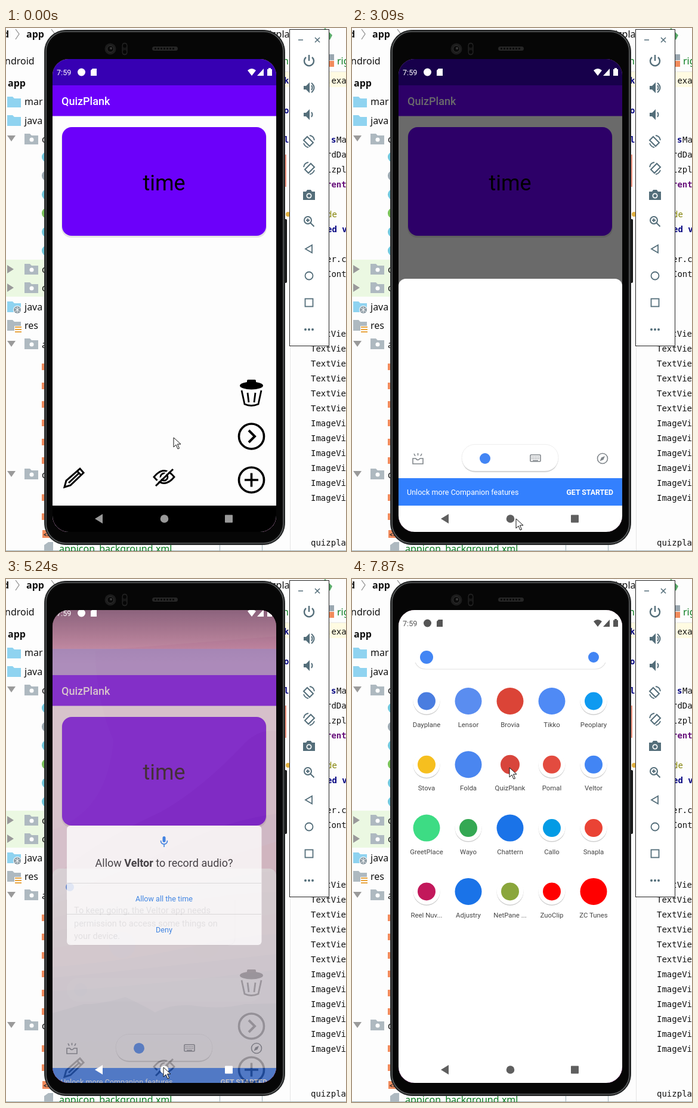
An HTML page for the animation above (8000 ms loop, 570 by 876 pixels).

```html
<!DOCTYPE html>
<html lang="en">
<head>
<meta charset="utf-8">
<title>Card app in an emulator</title>
<style>
html, body { margin: 0; width: 100%; height: 100%; overflow: hidden; background: #fff; }
svg { display: block; width: 570px; height: 876px; }
text { font-family: Roboto, sans-serif; white-space: pre; }
.ide { font: 16px "Noto Sans", "Open Sans", sans-serif; fill: #111; }
.code { font: 14px "DejaVu Sans Mono", monospace; fill: #111; }
.b { font-weight: 700; }
.m { font-weight: 500; }
.mid { text-anchor: middle; }
</style>
</head>
<body>
<svg id="stage" viewBox="0 0 570 876"></svg>
<script>
const LOOP = 8000;
const stage = document.getElementById('stage');

// ---- drawing helpers ----
const rect = (x, y, w, h, fill, r = 0, more = '') =>
  `<rect x="${x}" y="${y}" width="${w}" height="${h}" rx="${r}" fill="${fill}" ${more}/>`;
const disc = (x, y, r, fill, more = '') => `<circle cx="${x}" cy="${y}" r="${r}" fill="${fill}" ${more}/>`;
const path = (d, fill, more = '') => `<path d="${d}" fill="${fill}" ${more}/>`;
const stroke = (d, color, w = 2, more = '') =>
  `<path d="${d}" fill="none" stroke="${color}" stroke-width="${w}" ${more}/>`;
const text = (x, y, s, size, fill, cls = '', more = '') =>
  `<text x="${x}" y="${y}" font-size="${size}" fill="${fill}" class="${cls}" ${more}>${s}</text>`;
const group = (id, body, more = '') => `<g id="${id}" ${more}>${body}</g>`;

// ---- code editor behind the device ----
const ide = (x, y, s, cls = '', style = '') => `<text x="${x}" y="${y}" class="ide ${cls}" style="${style}">${s}</text>`;
const code = (x, y, s, cls = '', fill = '#111') => `<text x="${x}" y="${y}" class="code ${cls}" style="fill:${fill}">${s}</text>`;
const folder = (x, y, c, dot) =>
  path(`M${x} ${y - 9}h9l3 3h11v15h-23z`, c) + (dot ? disc(x + 12, y + 1, 3.5, '#fff') : '');
const open = y => path(`M2 ${y - 5}h14l-7 10z`, '#9a9a9a');
const shut = y => path(`M2 ${y - 7}l11 7l-11 7z`, '#9a9a9a');

function editor() {
  const blue = '#8fd3f0', gray = '#aeb9c0', navy = '#000080', orange = '#f28b5c';
  let s = rect(0, 0, 570, 876, '#fdfdfd') + rect(0, 388, 70, 62, '#ebf8e2') +
    rect(460, 73, 110, 26, '#fffbe2') + stroke('M460 73H570M476.5 530V876', '#e4e4e4', 1) +
    stroke('M429.5 860V876M358.5 860V876M0 875.5H570', '#9fb2b8', 1);
  s += ide(-5, 16, 'd', 'b') + ide(34, 16, 'app', 'b') + ide(-2, 61, 'ndroid') + ide(3, 98, 'app', 'b') +
    stroke('M16 2l6 8l-6 9M76 2l6 8l-6 9', '#888', 1.2);
  s += folder(2, 124, blue) + ide(31, 129, 'mar') + folder(2, 155, blue) + ide(31, 161, 'java') +
    open(185) + folder(31, 186, gray, 1) + ide(60, 192, 'c');
  ['#6fc7dd', '#9aa7b0', '#6fc7dd', '#78c257', '#6fc7dd', '#6fc7dd']
    .forEach((c, i) => s += disc(69, 216 + i * 31.4, 9, c));
  for (const y of [404, 435]) s += shut(y) + folder(31, y, gray, 1) + ide(60, y + 6, 'c');
  s += folder(2, 467, blue) + disc(19, 472, 7, '#fff') + disc(19, 472, 6, '#8c9aa3') +
    stroke('M15 469l8 6M15 475l8-6M19 467v10', '#fff', 1) + ide(31, 473, 'java');
  s += folder(2, 498, gray) + rect(14, 499, 12, 12, '#fff') +
    stroke('M15 501h11M15 505h11M15 509h11', '#e8a33d', 2) + ide(31, 504, 'res');
  s += open(529) + folder(31, 529, gray, 1) + ide(60, 536, 'a') + open(747) + folder(31, 747, gray, 1) + ide(60, 754, 'd');
  for (const y of [567, 599, 630, 661, 693, 724, 786, 818]) s += rect(60, y - 5, 10, 11, orange);
  s += rect(61, 841, 18, 13, orange) + text(63, 852, '&lt;&gt;', 11, '#333', 'b') +
    path('M64 866l7-5h8v14H64z', '#aeb9c0') + ide(89, 878, 'appicon_background.xml', '', 'fill:#0a7d20;text-decoration:underline');

  s += ide(431, 16, 'uizplan') + path('M527 8l8-8l12 12l-4 8l-6-9l-3 3z', '#59a869') +
    rect(540, 44, 10, 10, '#9aa7b0') + rect(540, 55, 10, 10, orange) +
    ide(555, 61, 'righ', '', 'fill:#0a7d20') + ide(464, 61, 'n', '', 'fill:#0a7d20');
  s += rect(465, 212, 5, 54, '#f0907a') + disc(473, 312, 4, '#e0b040');
  [[88, 'k'], [138, 'o'], [187, 'l']].forEach(([y, c]) => s += code(466, y + 5, c, 'b', navy));
  s += code(537, 93, '.exa') + code(545, 192, 's', 'b', navy) + code(554, 192, 'Ma') + code(537, 217, 'rdDa') +
    code(537, 242, 'izpl') + code(537, 267, 'rent', 'b', '#660e7a') + code(538, 317, 'de', '', '#808000') +
    code(538, 342, 'ed v', 'b', navy) + code(537, 392, 'er.c') + code(537, 417, 'Cont');
  for (let i = 0; i < 12; i++) s += code(511, 517 + i * 25, i < 6 ? 'TextVie' : 'ImageVi');
  return s + code(511, 867, 'quizpla');
}

// ---- emulator side bar ----
function sideBar() {
  const c = '#546e7a', at = (y, body) => `<g transform="translate(508 ${y})">${body}</g>`;
  const speaker = path('M-9 -3h4l6-6v18l-6-6h-4z', c);
  const rotate = stroke('M-3 -8l10 10l-6 6l-10-10z', c, 2) + stroke('M-9 3q2 6 8 7M9 -2q-1-7-8-8', c, 1.8);
  return rect(475.5, 2.5, 66, 530, '#fff', 0, 'stroke="#222"') +
    stroke('M490 20h8M518 16l8 8M526 16l-8 8', c, 1.6) +
    at(55, stroke('M-5 -6a8 8 0 1 0 10 0M0 -10v10', c, 2.4)) +
    at(100, speaker + stroke('M4 -4q3 4 0 8M4 -8q9 8 0 16', c, 2)) +
    at(145, speaker + stroke('M4 -4q3 4 0 8', c, 2)) +
    at(190, rotate) + at(235, `<g transform="scale(-1 1)">${rotate}</g>`) +
    at(280, path('M-10 -6h5l2-3h6l2 3h5v14h-20z', c) + disc(0, 1, 4.5, '#fff') + disc(0, 1, 2.8, c)) +
    at(324, disc(-2, -2, 6, 'none', `stroke="${c}" stroke-width="2"`) + stroke('M2.5 2.5l6 6M-5 -2h6M-2 -5v6', c, 2)) +
    at(370, stroke('M5 -6.5v13l-11-6.5z', c, 1.8)) +
    at(415, disc(0, 0, 6.5, 'none', `stroke="${c}" stroke-width="1.8"`)) +
    at(460, rect(-6.5, -6.5, 13, 13, 'none', 0, `stroke="${c}" stroke-width="1.8"`)) +
    at(505, disc(-6, 0, 2, c) + disc(0, 0, 2, c) + disc(6, 0, 2, c));
}

function deviceBody() {
  return rect(465, 320, 6, 107, '#111', 2) +
    rect(64.5, 3.5, 403, 862, '#0a0a0a', 36, 'stroke="#3c3f40"') +
    rect(67, 6, 398, 857, 'none', 33, 'stroke="#606364" stroke-width="1.6"') +
    rect(70, 9, 392, 851, '#060606', 31) +
    disc(175, 35, 9.5, '#1c1c1c') + disc(175, 35, 5.5, '#0a0a0a', 'stroke="#333"') + disc(176, 34, 2, '#3a3a3a') +
    rect(195, 25, 8, 20, '#161616', 4, 'stroke="#262626"') + disc(199, 30, 3, '#050505') + disc(199, 40, 3, '#050505') +
    rect(245, 31, 43, 7, '#262626', 3.5) + stroke('M249 34.5h35', '#0c0c0c', 3, 'stroke-dasharray="3 2"');
}

// ---- app ----
function app() {
  const ring = y => disc(411.5, y, 21, 'none', 'stroke="#000" stroke-width="3.6"');
  return rect(78, 147, 375, 740, '#fdfdfd') + rect(78, 52, 375, 44, '#3700b3', 0, 'id="strip"') +
    rect(78, 96, 375, 51.5, '#6c00fa') + text(93, 129, 'QuizPlank', 18, '#fff', 'm') +
    rect(93, 168, 344, 183, '#000', 16, 'opacity=".1"') + rect(94, 166, 342, 182, '#6c00fa', 16) +
    text(265, 271.5, 'time', 36, '#000', 'mid') +
    rect(404, 589, 15, 6, '#000', 2) + '<ellipse cx="411.5" cy="599" rx="19.5" ry="6.5"/>' +
    stroke('M395 607l5 23q11 5 23 0l5-23M405 611l2 16M418 611l-2 16', '#000', 2.8) +
    ring(684) + stroke('M407 674l10 10l-10 10', '#000', 4) +
    ring(757) + stroke('M400 757h23M411.5 745.5v23', '#000', 3.6) +
    stroke('M248 752q17-21 34 0q-17 21-34 0z', '#000', 2.8) + disc(265, 752, 6, 'none', 'stroke="#000" stroke-width="2.8"') +
    stroke('M249 764l30-28', '#fdfdfd', 3) + stroke('M251 767l29-28', '#000', 3) +
    stroke('M98 769l3-11l23-20l6 7l-22 21zM119 742l7 7M105 762l18-17', '#000', 3);
}

// ---- voice sheet ----
function sheet() {
  const g = '#80868b';
  return rect(78, 420, 375, 470, '#fff', 12) +
    text(265, 460, 'Try saving', 27, '#111', 'b mid', 'id="heading"') +
    group('bubble', disc(107, 451, 7, '#4285f4') +
      stroke('M102 472v64q0 12 12 12h258q12 0 12-12v-64', '#e0e0e0', 1) +
      text(114, 495, 'To keep going, the Veltor app needs', 14.5, '#5f6368') +
      text(114, 517, 'permission to access some things on', 14.5, '#5f6368') +
      text(114, 538, 'your device.', 14.5, '#5f6368')) +
    stroke('M102 721v9h17v-9h-5q-4 5-7 0zM110.5 712v4M104 713l2 4M117 713l-2 4', g, 1.6) +
    rect(184, 699, 162, 45, '#ccc', 22.5) + rect(184, 697.5, 162, 44.5, '#fff', 22, 'stroke="#eee"') +
    disc(223, 721, 9, '#4285f4') +
    rect(299, 715, 17, 11, 'none', 1, `stroke="${g}" stroke-width="1.6"`) +
    stroke('M301 718.5h13M301 721.5h13', g, 1.6, 'stroke-dasharray="1.6 1.2"') + stroke('M303 724.5h9', g, 1.4) +
    disc(420, 721, 8.5, 'none', `stroke="${g}" stroke-width="1.6"`) + path('M424 717l-2.5 6l-6 2.5l2.5-6z', g) +
    rect(78, 754, 375, 46, '#3380fe') + text(92, 782, 'Unlock more Companion features', 12.6, '#fff') +
    text(438, 782, 'GET STARTED', 12.3, '#fff', 'b', 'text-anchor="end"');
}

function dialog() {
  const b = '#1a73e8';
  return rect(102, 348, 326.5, 200, '#fff', 6) + stroke('M102 444.5H428M102 496.5H428', '#dcdcdc', 1) +
    rect(262.5, 366, 5, 10, b, 2.5) + stroke('M259.5 373q0 6 5.5 6t5.5-6M265 379v5', b, 1.6) +
    text(265, 417, 'Allow <tspan class="b">Veltor</tspan> to record audio?', 18, '#202124', 'mid') +
    text(265, 475, 'Allow all the time', 12.6, b, 'mid') + text(265, 527, 'Deny', 12.6, b, 'mid');
}

// ---- home screen ----
function wallpaper() {
  const hills = [
    ['420Q170 390 180 270Q150 200 150 120L453 96', '#f4a8c8'],
    ['500Q150 440 260 390Q330 350 400 275Q425 250 453 255', '#ea98bc'],
    ['535Q220 480 300 440Q370 405 453 393', '#dc8ab4'],
    ['545Q160 515 250 492Q360 470 453 440', '#de80a4'],
    ['568Q200 535 300 515T453 488', '#d07098'],
    ['590Q180 575 270 550T453 525', '#c46490'],
    ['618Q200 600 300 585T453 560', '#c05288'],
    ['650Q200 640 300 618T453 595', '#a04880'],
    ['668Q220 655 453 628', '#823a78'],
    ['690Q200 685 453 655', '#642a70']
  ];
  return rect(78, 52, 375, 792, '#f8b0cc') +
    hills.map(([d, c]) => path(`M78 ${d}V844H78z`, c)).join('') +
    path('M78 727Q105 720 130 712Q160 713 200 700Q230 714 250 726Q275 712 310 714Q360 722 400 712L453 711V844H78z', '#300049') +
    rect(78, 760, 375, 84, 'url(#low)') + rect(78, 52, 375, 90, 'url(#top)');
}
const searchMarks = y => disc(125, y, 11, '#4285f4') + disc(405, y, 9, '#4285f4');
const dock = () => disc(195, 682, 22, '#1a73e8') + disc(335, 682, 22, '#db4437') +
  rect(102, 737, 326, 40, '#ded6e2', 20, 'opacity=".94"') + searchMarks(757);

// name, colour, white plate
const APPS = [
  ['Dayplane', '#4a7de0', 1], ['Lensor', '#5a8df0'], ['Brovia', '#db4437'], ['Tikko', '#4f8af5'], ['Peoplary', '#0f9af0', 1],
  ['Stova', '#f6bf1f', 1], ['Folda', '#4a86f0'], ['QuizPlank', '#d8453c', 2], ['Pomal', '#e34b3f', 1], ['Veltor', '#4285f4', 1],
  ['GreetPlace', '#3ddc84'], ['Wayo', '#34a853', 1], ['Chattern', '#1a73e8'], ['Callo', '#039be5', 1], ['Snapla', '#ea4335', 1],
  ['Reel Nuv...', '#c2185b', 1], ['Adjustry', '#1a73e8'], ['NetPane ...', '#8aa63c', 1], ['ZuoClip', '#f00', 1], ['ZC Tunes', '#f00']
];
function drawer() {
  let s = rect(78, 52, 375, 900, '#fff') + stroke('M106 140q5 11 18 11h283q13 0 18-11', '#e2e2e2', 1.2) + searchMarks(131);
  APPS.forEach(([name, color, plate], i) => {
    const x = 125 + i % 5 * 70, y = 204.5 + Math.floor(i / 5) * 106.3;
    if (plate === 1) s += disc(x, y + 1, 22.5, '#cfcfcf') + disc(x, y - .5, 22.5, '#fff');
    s += disc(x, y, [22.5, 15, 16][plate || 0], color) + text(x, y + 43.5, name, 11.4, '#444', 'mid');
  });
  return s;
}

// ---- system bars ----
const statusBar = () => text(85, 79, '7:59', 12.6, 'currentColor') + disc(126.5, 74, 6.5, 'currentColor') +
  path('M145 68h7v12h-10v-9zM405 71q7-6 14 0l-7 9zM432 68v12h-11zM440 67h4v2h2v11h-8v-11h2z', 'currentColor');
const navIcons = () => path('M149 822l13-8v16z', 'currentColor') + disc(265.5, 822, 6.8, 'currentColor', 'id="homeKey"') +
  rect(367, 815.5, 13, 13, 'currentColor', 1);

const grad = (id, c, a, b) => `<linearGradient id="${id}" x2="0" y2="1"><stop stop-color="${c}" stop-opacity="${a}"/>` +
  `<stop offset="1" stop-color="${c}" stop-opacity="${b}"/></linearGradient>`;
const black = (id, y, h) => rect(78, y, 375, h, '#000', 0, `id="${id}"`);

stage.innerHTML = `<defs>${grad('top', '#503858', .5, 0)}${grad('low', '#240030', 0, 1)}
  <clipPath id="screen">${rect(78, 52, 375, 792, '#000', 27)}</clipPath></defs>` +
  editor() + deviceBody() +
  '<g clip-path="url(#screen)">' + wallpaper() + group('dock', dock()) +
  text(266, 166, 'Thursday, Apr 1', 22.2, '#fff', 'mid', 'id="date"') +
  group('app', app() + black('scrim', 52, 792) + black('navLow', 800, 44)) +
  group('sheet', sheet()) + black('dim', 52, 792) + group('dialog', dialog()) +
  group('drawer', drawer()) + black('navTop', 800, 44) +
  rect(217, 800, 96, 44, '#fff', 22, 'id="pill"') +
  group('status', statusBar()) + group('nav', navIcons()) + '</g>' + sideBar() +
  group('cursor', path('M0 0v16l4-4l3 7l2.5-1l-3-7h5.5z', '#fff', 'stroke="#111" stroke-width="1"'));

const el = {};
stage.querySelectorAll('[id]').forEach(e => el[e.id] = e);

// ---- motion ----
// first step, last step, number of steps
const BURSTS = [[150, 540, 4], [850, 850, 1], [1130, 1130, 1], [1950, 2370, 4], [2640, 3670, 8],
  [3820, 4120, 3], [4680, 5630, 8], [5750, 6320, 5], [6740, 7290, 5], [7720, 7870, 2]];
const STEPS = [0];
for (const [a, b, n] of BURSTS)
  for (let i = 0; i < n; i++) STEPS.push(n > 1 ? a + (b - a) * i / (n - 1) : a);

// piecewise linear track of [time, value]
function track(t, ...keys) {
  let i = keys.length - 1;
  while (i > 0 && t < keys[i][0]) i--;
  const [t0, v0] = keys[i], next = keys[i + 1];
  if (!next || t <= t0) return v0;
  return v0 + (next[1] - v0) * (t - t0) / (next[0] - t0);
}
const fade = (id, v) => {
  el[id].setAttribute('opacity', v);
  el[id].style.display = v > 0 ? '' : 'none';
};
const move = (id, x, y) => el[id].setAttribute('transform', `translate(${x} ${y})`);
const tint = (id, v) => el[id].style.color = `rgb(${v},${v},${v})`;

function draw(t) {
  const drop = track(t, [4900, 0], [5223, 65], [5630, 160]);

  fade('app', track(t, [4810, 1], [5223, .67], [5629, .1], [5630, 0]));
  move('app', 0, drop);
  fade('scrim', track(t, [2639, 0], [2640, .38], [3081, .58], [3670, .58], [4120, 0]));
  fade('navLow', t < 4680 ? 1 : 0);
  const w = track(t, [3670, 0], [4120, 1], [4810, 1], [5223, .62], [5630, .3]);
  el.strip.setAttribute('fill', `rgb(${55 + 200 * w},${255 * w},${179 + 76 * w})`);

  fade('sheet', track(t, [2639, 0], [2640, .66], [2787, 1], [4810, 1], [5223, .66], [5630, 0]));
  move('sheet', 0, track(t, [2640, 367], [2787, 180], [2934, 55], [3081, 0]) + drop);
  fade('heading', track(t, [2640, 1], [2934, 0]));
  fade('bubble', track(t, [3081, 0], [3523, 1]));

  fade('dim', track(t, [3670, 0], [4120, .6], [4680, .6], [5223, .145], [5630, 0]));
  fade('dialog', track(t, [3670, 0], [4120, 1], [4810, 1], [5223, .78], [5630, 0]));
  move('dialog', 0, drop);

  fade('dock', track(t, [4951, 0], [5223, .12], [5630, .4], [6035, 1], [6740, 1], [7015, 0]));
  move('dock', 0, track(t, [5223, -69], [5630, -25], [6035, 0], [6740, 0], [7152, -120]));
  fade('date', track(t, [5630, 0], [6035, 1], [6740, 1], [6950, 0]));
  fade('drawer', t > 6740 ? 1 : 0);
  move('drawer', 0, track(t, [6740, 792], [6878, 560], [7015, 250], [7152, 60], [7290, 0]));

  fade('status', track(t, [3670, 1], [3970, 0], [5087, 0], [5223, 1]));
  move('status', 0, track(t, [5087, 0], [5088, -26], [5223, -17], [5500, 0]));
  tint('status', track(t, [7015, 255], [7290, 85]));
  tint('nav', track(t, [1129, 153], [1130, 255], [2787, 255], [3081, 95], [3670, 95], [4120, 255], [6740, 255], [7015, 95]));
  fade('navTop', track(t, [3670, 0], [4120, 1], [4690, 1], [5087, 0]));
  fade('pill', track(t, [1129, 0], [1130, .2], [1810, .2], [2370, 0], [4679, 0], [4680, .2], [5087, 0]));
  fade('homeKey', track(t, [4679, 1], [4680, .65], [5087, 1]));

  move('cursor',
    track(t, [20, 281], [540, 276], [849, 276], [850, 275], [3670, 275], [4120, 264], [5610, 264],
      [6320, 253], [6740, 253], [7290, 279], [7570, 279], [7870, 264]),
    track(t, [20, 686], [540, 822], [3670, 822], [4120, 818], [5610, 818],
      [6320, 559.5], [6740, 559.5], [7290, 278], [7570, 278], [7870, 316]));
}

let shown = -1;
function tick() {
  const now = performance.now() % LOOP;
  let t = 0;
  for (const s of STEPS) if (s <= now) t = s;
  if (t !== shown) draw(shown = t);
  requestAnimationFrame(tick);
}
tick();
</script>
</body>
</html>
```
